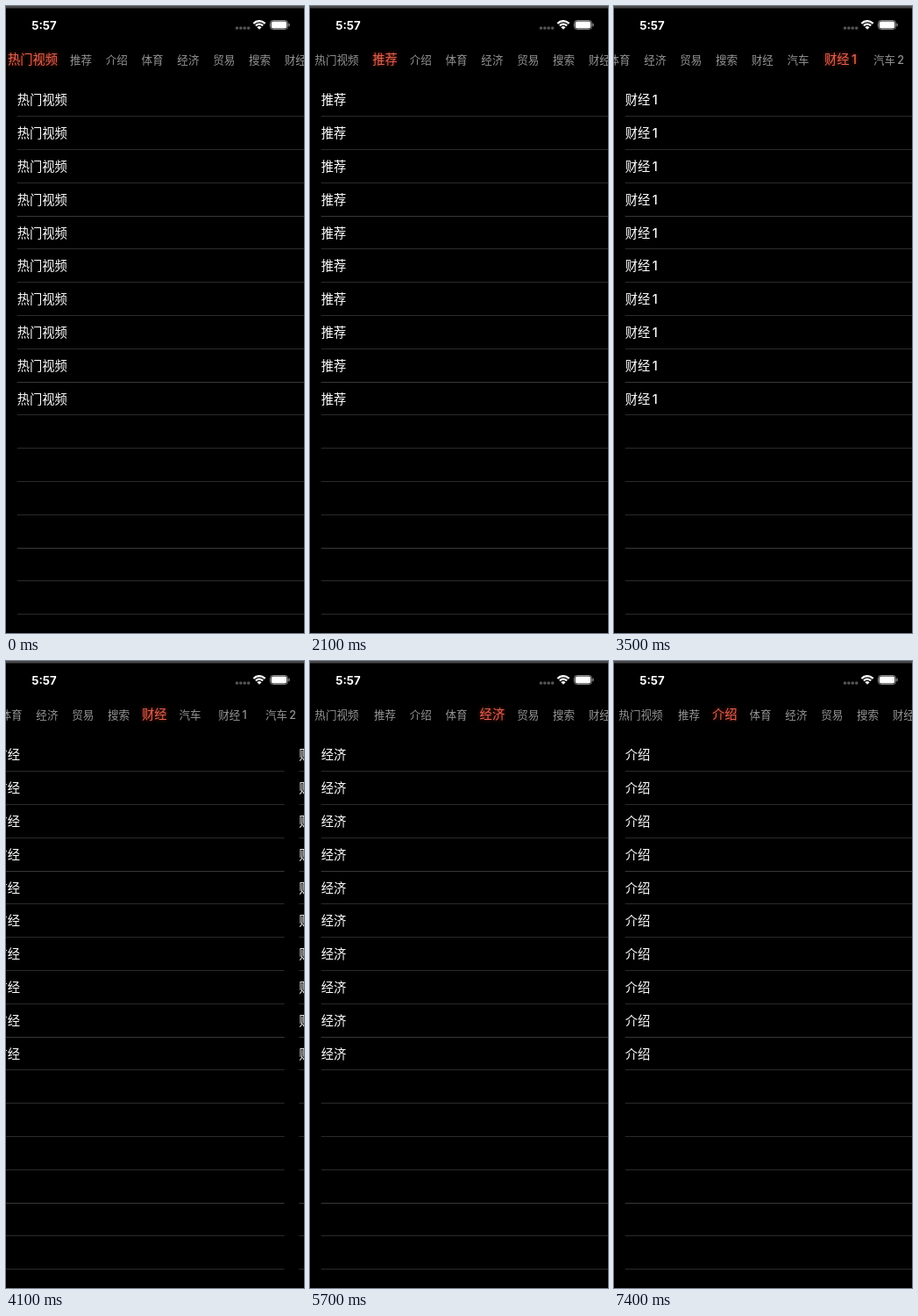
These frames come from a looping animation (340 by 714 pixels, 7900 ms). An HTML page with a canvas:

```html
<!DOCTYPE html>
<html lang="zh-CN">
<head>
<meta charset="utf-8">
<style>
html, body { margin: 0; height: 100%; overflow: hidden; background: #000; }
canvas { display: block; }
</style>
</head>
<body>
<canvas id="stage" width="340" height="714"></canvas>
<script>
const ctx = document.getElementById('stage').getContext('2d');
const LOOP = 7900, STEP = 100, SLIDE = 340, PRESS = 60;
const PAGE = 347, LEFT = -4, INSET = 16.7, ROW = 37.8;
const FONT = '"Inter", "Noto Sans CJK SC", "Noto Sans CJK", sans-serif';
const tabs = ['热门视频', '推荐', '介绍', '体育', '经济', '贸易', '搜索', '财经', '汽车',
  '财经\u20091', '汽车\u20092'];
const centers = tabs.map((_, i) =>
  i === 0 ? 30.5 : i < 9 ? 85.5 + 40.8 * (i - 1) : 419.5 + 55 * (i - 9));

// Taps on the tab bar: [start of slide, page]
const taps = [[1150, 1], [2300, 3], [2675, 5], [3160, 9], [3825, 7], [4270, 5],
  [5050, 4], [5880, 1], [6359, 0], [6770, 2]];

const ease = u => u < 0.5 ? 2 * u * u : 1 - 2 * (1 - u) ** 2;
const mix = (a, b, k) => a + (b - a) * k;
const stripAt = page => page > 4 ? 161 : 0;

// Whatever the distance, only the old and the new page slide past each other.
function stateAt(t) {
  const s = { from: 0, page: 0, k: 1, strip: 0, pressed: -1 };
  for (const [start, page] of taps) {
    if (t < start) {
      if (t >= start - PRESS) s.pressed = page;
      break;
    }
    s.from = s.page;
    s.page = page;
    s.k = ease(Math.min(1, (t - start) / SLIDE));
    s.strip = mix(stripAt(s.from), stripAt(page), s.k);
  }
  return s;
}

function rect(x, y, w, h, color) {
  ctx.fillStyle = color;
  ctx.fillRect(x, y, w, h);
}

function pill(x, y, w, h, r, color) {
  ctx.fillStyle = color;
  ctx.beginPath();
  ctx.roundRect(x, y, w, h, r);
  ctx.fill();
}

function text(str, x, cy, size, color, align = 'left', weight = 500) {
  ctx.font = `${weight} ${size}px ${FONT}`;
  ctx.textAlign = align;
  ctx.fillStyle = color;
  ctx.fillText(str, x, cy + size * 0.38);
}

function drawStatus() {
  rect(0, 0, 340, 2.5, '#484848');
  text('5:57', 43.5, 21.8, 13.2, '#fff', 'center', 700);
  for (let i = 0; i < 4; i++) pill(261.8 + 4.4 * i, 23.4, 3.4, 3.4, 1.4, '#555');

  ctx.strokeStyle = '#fff';
  ctx.lineWidth = 2.3;
  for (const r of [9, 5.5]) {
    ctx.beginPath();
    ctx.arc(289, 26.2, r, -Math.PI * 0.76, -Math.PI * 0.24);
    ctx.stroke();
  }
  ctx.fillStyle = '#fff';
  ctx.beginPath();
  ctx.moveTo(289, 26.8);
  ctx.arc(289, 26.8, 3.6, -Math.PI * 0.76, -Math.PI * 0.24);
  ctx.fill();

  ctx.strokeStyle = '#888';
  ctx.lineWidth = 1;
  ctx.beginPath();
  ctx.roundRect(301.5, 16.5, 20, 10, 3);
  ctx.stroke();
  pill(302.7, 17.6, 17.6, 7.8, 1.8, '#fff');
  pill(322.5, 19.8, 1.3, 3.4, 0.6, '#888');
}

function drawTabs({ page, strip, pressed }) {
  tabs.forEach((name, i) => {
    const on = i === page;
    const color = on ? '#e0624f' : i === pressed ? '#606060' : '#949494';
    ctx.shadowColor = '#a02818';
    ctx.shadowBlur = on ? 4 : 0;
    text(name, centers[i] - strip, 61, on ? 14.3 : 12.57, color, 'center');
  });
  ctx.shadowBlur = 0;
}

function drawPage(index, x) {
  for (let k = 0; k < 16; k++) {
    const y = Math.floor(125.7 + ROW * k);
    rect(x + INSET, y, PAGE - INSET, 1, k % 5 === 3 ? '#383838' : '#2a2a2a');
    if (k < 10) text(tabs[index], x + INSET, 107 + ROW * k, 14.3, '#fff');
  }
}

function draw(now) {
  const t = Math.floor((now % LOOP) / STEP) * STEP;
  const state = stateAt(t);
  const { from, page, k } = state;
  const dir = Math.sign(page - from);
  rect(0, 0, 340, 714, '#000');
  if (k < 1) drawPage(from, LEFT - dir * k * PAGE);
  drawPage(page, LEFT + dir * (1 - k) * PAGE);
  drawTabs(state);
  drawStatus();
}

let begin;
function tick(now) {
  begin ??= now;
  draw(now - begin);
  requestAnimationFrame(tick);
}
requestAnimationFrame(tick);
</script>
</body>
</html>
```
